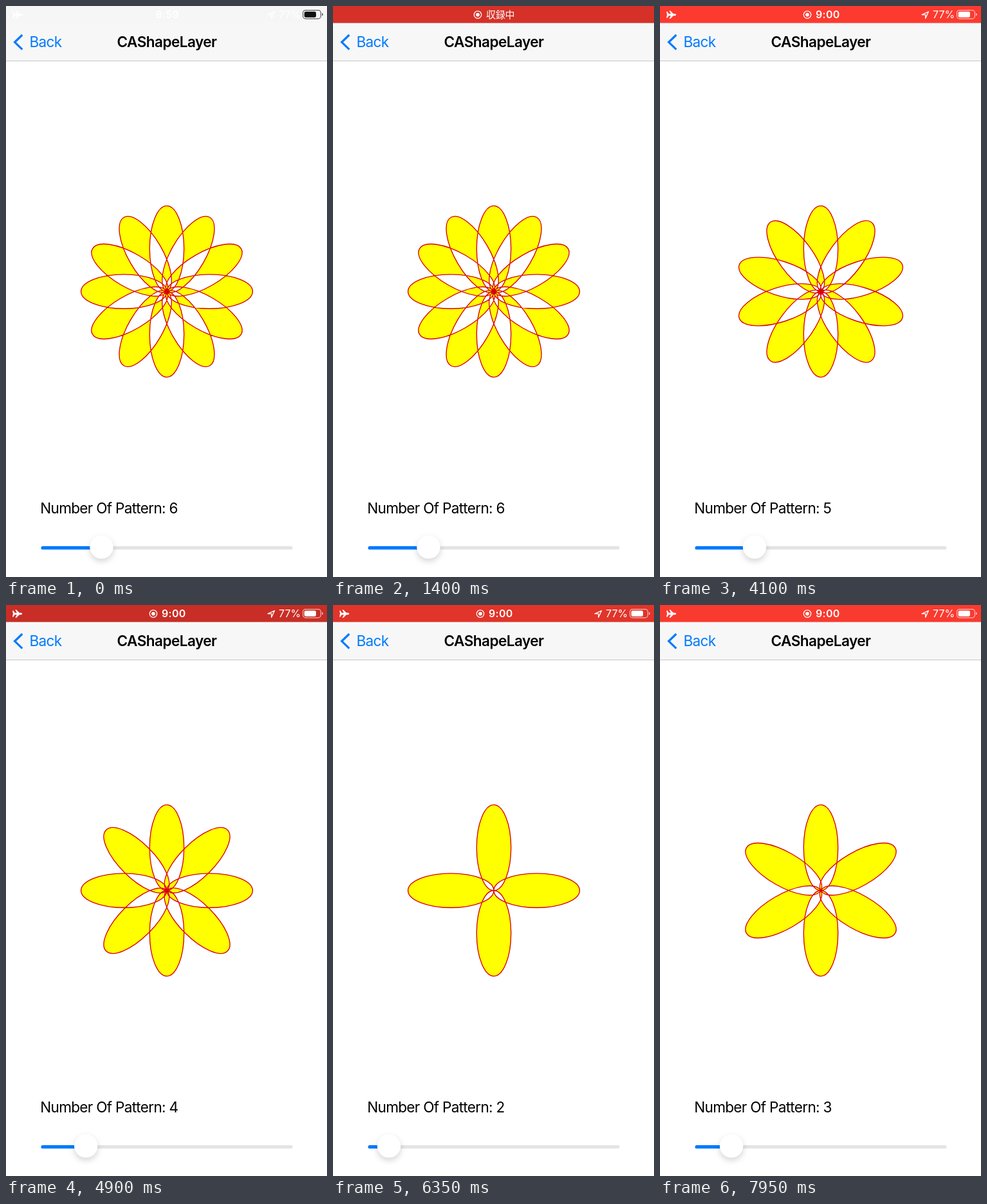
Write an HTML page that moves like this. It is 499 by 889 pixels and loops after 8 s.

```html
<!DOCTYPE html>
<html lang="en">
<head>
<meta charset="utf-8">
<title>Shape layer demo</title>
<style>
  html, body { margin: 0; width: 100%; height: 100%; overflow: hidden; background: #fff; }
  svg { display: block; width: 499px; height: 889px; }
  text { font-family: Inter, Roboto, sans-serif; font-size: 22.6px; letter-spacing: -.72px; }
  .status text { font-size: 16px; letter-spacing: .1px; fill: #fff; }
  .status .clock { font-weight: 600; letter-spacing: .3px; }
  .status .recording {
    font: 300 15px "Noto Sans CJK JP", "Noto Sans CJK", sans-serif;
    letter-spacing: -.2px;
  }
  .title { font-weight: 600; letter-spacing: -.58px; text-anchor: middle; }
  .thumb { filter: drop-shadow(0 4px 5px rgba(0, 0, 0, .17)); }
</style>
</head>
<body>
<svg viewBox="0 0 499 889">
  <defs>
    <g id="record">
      <circle r="5.7" fill="none" stroke="#fff" stroke-width="1.3"/>
      <circle r="2.9" fill="#fff"/>
    </g>
  </defs>

  <rect width="499" height="889" fill="#fff"/>
  <rect width="499" height="85" fill="#f7f7f7"/>
  <rect y="85" width="499" height="1" fill="#c6c6c8"/>
  <rect id="bar" width="499" height="26.5"/>

  <g class="status">
    <g id="icons">
      <path fill="#fff" d="M10 8.8h1.5l2 3.2h3.4L14.3 7.4h1.9l4.5 4.6h2.6q1.9.5 1.9 1.6t-1.9 1.6h-2.6l-4.5 4.6h-1.9l2.6-4.6h-3.4l-2 3.2H10l1-4.8z"/>
      <path fill="none" stroke="#fff" stroke-width="1.3" stroke-linejoin="round" d="M407 13.6 417.5 8.8 412.7 19.3V13.6z"/>
      <text x="424" y="19.4">77%</text>
      <g id="battery">
        <rect x="461.6" y="6.6" width="27.8" height="13.2" rx="4" fill="none" stroke="currentColor" stroke-opacity=".65" stroke-width="1.2"/>
        <rect x="463.7" y="8.7" width="18.3" height="9" rx="2.2" fill="currentColor"/>
        <path fill="currentColor" fill-opacity=".65" d="M491 11q2 .6 2 2.2t-2 2.2z"/>
      </g>
      <use id="dot" href="#record" x="229" y="13.6"/>
      <text id="clock" class="clock" y="19.4"></text>
    </g>
    <g id="recording">
      <use href="#record" x="225" y="13.6"/>
      <text class="recording" x="238" y="19.2">収録中</text>
    </g>
  </g>

  <path d="M25.3 45 13.6 56.3 25.3 67.6" fill="none" stroke="#007aff" stroke-width="3.2"/>
  <text x="36.5" y="64.2" fill="#007aff">Back</text>
  <text class="title" x="250" y="64.2">CAShapeLayer</text>

  <path id="flower" fill="#ff0" fill-rule="evenodd" stroke="#d9000c" stroke-width="1.35"/>

  <text id="label" x="53.2" y="790"></text>
  <rect x="54.5" y="841" width="391" height="5.3" rx="2.65" fill="#e4e4e5"/>
  <rect id="filled" x="54.5" y="841" height="5.3" rx="2.65" fill="#007aff"/>
  <circle id="thumb" class="thumb" cy="842.4" r="18.2" fill="#fff"/>
</svg>

<script>
const LOOP = 8000;
const PULSE = 1900;
const BRIGHT_AT = 3950;
const THUMB_MIN = 71;
const STEP = 15.4;
const drag = [
  [0, 148.5], [3850, 148.5], [4100, 147], [4700, 129],
  [5800, 103], [6900, 71], [7600, 71], [7950, 111], [8000, 114]
];
const $ = id => document.getElementById(id);
const mix = (a, b, k) => a + (b - a) * k;
const ramp = (t, from, to) => Math.min(1, Math.max(0, (t - from) / (to - from)));

function thumbAt(t) {
  const i = drag.findIndex(([time]) => time > t);
  const [t0, x0] = drag[i - 1], [t1, x1] = drag[i];
  return mix(x0, x1, (t - t0) / (t1 - t0));
}

// Each pattern adds two opposite petals that meet at the centre.
function flowerPath(count) {
  const cx = 250, cy = 444.5, rx = 26.7, ry = 66.7;
  let d = "";
  for (let i = 0; i < 2 * count; i++) {
    const deg = 180 * i / count, a = deg * Math.PI / 180;
    const tip = `${cx + 2 * ry * Math.sin(a)} ${cy - 2 * ry * Math.cos(a)}`;
    const arc = `A${rx} ${ry} ${deg} 0 1 `;
    d += `M${cx} ${cy}${arc}${tip}${arc}${cx} ${cy}Z`;
  }
  return d;
}

function drawStatus(t) {
  const glow = (1 + Math.cos(2 * Math.PI * (t - BRIGHT_AT) / PULSE)) / 2;
  const shade = mix(200 / 255, 1, glow);
  $("bar").setAttribute("fill", `rgb(${[255, 59, 48].map(c => Math.round(c * shade))})`);
  $("bar").setAttribute("opacity", ramp(t, 0, 400));

  const message = ramp(t, 650, 850) * (1 - ramp(t, 3000, 3200));
  $("recording").setAttribute("opacity", message);
  $("icons").setAttribute("opacity", 1 - message);
  $("dot").setAttribute("opacity", ramp(t, 50, 600));
  $("battery").style.color = t < 50 ? "#111" : "#fff";
  $("clock").textContent = t < 2000 ? "8:59" : "9:00";
  $("clock").setAttribute("x", t < 50 ? 232.5 : t < 2000 ? 240.5 : 242);
}

let shown = 0;
function drawSlider(t) {
  const x = thumbAt(t);
  const count = Math.floor((x - THUMB_MIN) / STEP) + 1;
  $("thumb").setAttribute("cx", x);
  $("filled").setAttribute("width", x - 54.5);
  if (count === shown) return;
  shown = count;
  $("flower").setAttribute("d", flowerPath(count));
  $("label").textContent = `Number Of Pattern: ${count}`;
}

const start = performance.now();
function frame() {
  const t = (performance.now() - start) % LOOP;
  drawStatus(t);
  drawSlider(t);
  requestAnimationFrame(frame);
}
frame();
</script>
</body>
</html>
```
